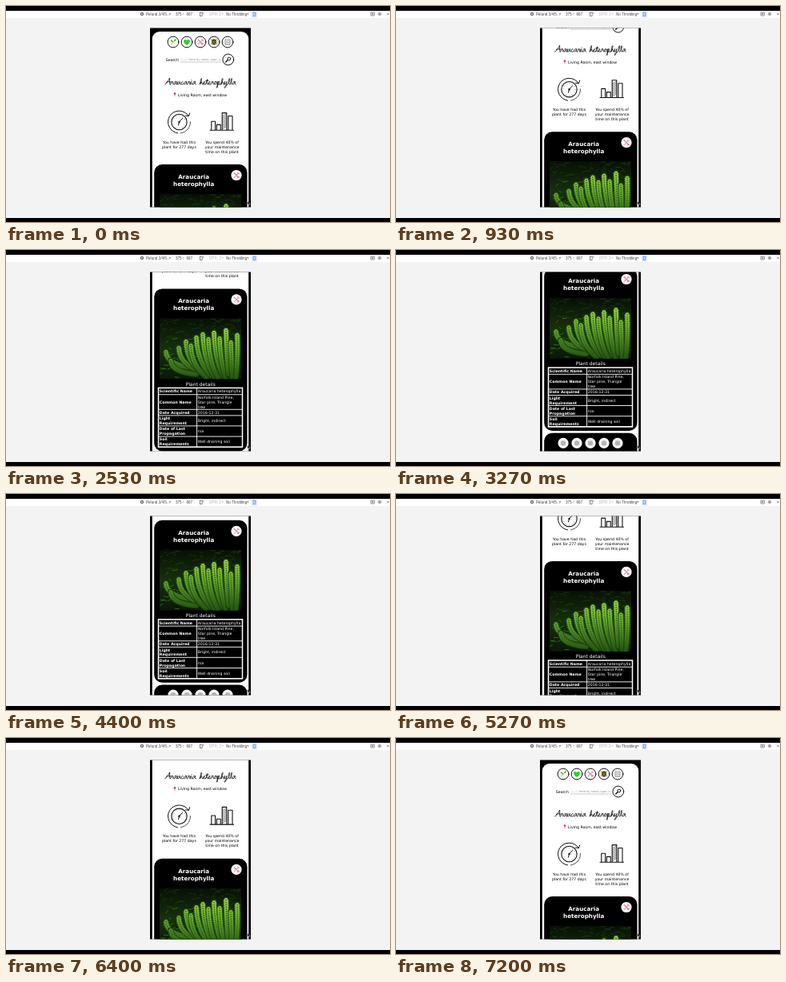
Recreate the animation shown at these times as an HTML page. Size 480x270 px, loop 7590 ms.

```html
<!DOCTYPE html>
<html lang="en">
<head>
<meta charset="utf-8">
<title>Plant page</title>
<style>
  html, body { margin: 0; width: 100%; height: 100%; overflow: hidden; background: #f3f3f3; }
  svg { display: block; width: 480px; height: 270px; }
  text { font: 4.7px "DejaVu Sans", Verdana, sans-serif; }
  .bar text { font: 4.6px "Liberation Sans", Arial, sans-serif; fill: #444; }
  .mid { text-anchor: middle; }
  .bold { font-weight: bold; }
  .line { fill: none; stroke: #111; stroke-linecap: round; stroke-linejoin: round; }
</style>
</head>
<body>
<svg viewBox="0 0 480 270">
  <defs>
    <clipPath id="screen"><rect x="180" y="27.5" width="126" height="224"/></clipPath>
    <clipPath id="photoBox"><rect width="102" height="76"/></clipPath>
    <linearGradient id="frond" gradientUnits="userSpaceOnUse" x1="0" y1="10" x2="0" y2="76">
      <stop offset="0" stop-color="#a5dc45"/>
      <stop offset=".45" stop-color="#62a62c"/>
      <stop offset="1" stop-color="#234f12"/>
    </linearGradient>
    <linearGradient id="shade" x1="0" y1="0" x2="0" y2="1">
      <stop offset="0" stop-color="#071005"/>
      <stop offset=".5" stop-color="#16300c"/>
      <stop offset="1" stop-color="#0a1806"/>
    </linearGradient>
    <g id="tools" class="line" stroke-width="1.1">
      <path stroke="#d9728c" style="stroke:#d9728c" d="M-3-3L3 3M1.6 3.2L3.2 1.6"/>
      <path style="stroke:#e59aac" d="M3-3L-3 3M1.6-3.4L2-2L3.4-1.6"/>
    </g>
  </defs>

  <rect width="480" height="270" fill="#f3f3f3"/>
  <g class="bar">
    <rect y="5" width="480" height="10" fill="#fff"/>
    <circle cx="170" cy="10" r="1.8" fill="#bbb" stroke="#555" stroke-width=".9"/>
    <text x="175" y="11.7">Pelund 3/4/5…</text>
    <text x="212" y="11.7">375</text>
    <text x="220.5" y="11.7" style="fill:#999">×</text>
    <text x="225.5" y="11.7">667</text>
    <g fill="none" stroke="#555" stroke-width=".7">
      <rect x="242.5" y="8" width="2.6" height="4.6"/>
      <path d="M246 8.2q1 .3 1 1.6"/>
      <rect x="456" y="8" width="4.4" height="4" rx=".7"/>
      <circle cx="458.2" cy="10" r=".7"/>
      <circle cx="467" cy="10" r="1.8" stroke-dasharray="1 .4"/>
      <circle cx="467" cy="10" r="1"/>
      <path d="M476.3 8.8l2.4 2.4m0-2.4l-2.4 2.4"/>
    </g>
    <text x="254" y="11.7" style="fill:#b5b5b5">DPR: 2</text>
    <text x="275" y="11.7">No Throttling</text>
    <path d="M203.8 9.2h2.4l-1.2 1.9zM301.2 9.2h2.2l-1.1 1.9z" fill="#555"/>
    <path d="M269.5 9.2h2.2l-1.1 1.9z" fill="#bbb"/>
    <rect x="307" y="6.5" width="7" height="8" fill="#dfeafb"/>
    <rect x="309.2" y="8" width="2.6" height="4.6" rx=".5" fill="none" stroke="#3f7fe0" stroke-width=".8"/>
  </g>
  <path d="M0 0H480V6H0zM0 265H480V270H0z"/>

  <g clip-path="url(#screen)">
    <rect x="180" y="27" width="126" height="226"/>
    <g id="page">
      <rect x="182.8" y="32" width="120.4" height="420" rx="9" fill="#fff"/>

      <g class="line" stroke-width="1" id="nav"></g>
      <g transform="translate(209 45)">
        <path class="line" stroke-width=".8" style="stroke:#63a52f" d="M-2.5 3L1-1"/>
        <path fill="#5fb52c" d="M1-1q0-3 3-2.6q0 2.6-3 2.6M0 0q-3.6 0-3.4-2.8q3 0 3.4 2.8"/>
      </g>
      <path transform="translate(226 45)" fill="#24d526" d="M0 4C-5 1-4.6-3-2.2-3Q-.8-3 0-1.8Q.8-3 2.2-3C4.6-3 5 1 0 4"/>
      <use href="#tools" x="243" y="45"/>
      <g transform="translate(260 45)">
        <ellipse rx="3" ry="3.4" fill="#302a10"/>
        <path class="line" stroke-width="1" style="stroke:#d5a51d" d="M-2-1H2M-2 1.2H2"/>
        <path class="line" stroke-width=".9" style="stroke:#55801f" d="M-2-2L-4-3M2-2L3.6-3.4M-2.6 2L-4 2.6M2.6 2L4 2.8"/>
      </g>
      <path transform="translate(277 45)" fill="none" stroke="#888" stroke-width=".7" d="M-3-3.5H3V3.5H-3zM-3-1.6H3M-3 .2H3M-3 2H3"/>

      <text x="199.8" y="68.8">Search</text>
      <text x="218.5" y="68.4" style="font-size:3.5px;fill:#888">♧♤♧ here by name, type, a</text>
      <path d="M218 70H268.5" stroke="#aaa" stroke-width=".6"/>
      <g class="line">
        <circle cx="278.8" cy="66" r="1.9" stroke-width="1"/>
        <path d="M277.2 67.6L274.7 70" stroke-width="1.4"/>
      </g>

      <g id="script" class="line" stroke-width=".85" role="img" aria-label="Araucaria heterophylla"></g>
      <circle cx="211" cy="109.5" r="1.3" fill="#d8344d"/>
      <path d="M211 110v2.9" stroke="#a33" stroke-width=".6"/>
      <text x="215" y="112.6">Living Room, east window</text>

      <g class="line" transform="translate(216.5 145)">
        <circle r="9.7" stroke-width="1.1"/>
        <circle r="7.7" stroke-width="1.3" stroke-dasharray=".3 3.73" stroke-linecap="butt"/>
        <path stroke-width="1" d="M0 0L4.2-4.6M0 0L-1 4M11.6-7.8A14 14 0 1 0-2 13.9"/>
        <path stroke-width="1" d="M13.2-11.2L12-7.4L8-8"/>
        <path stroke-width=".8" stroke-dasharray="2 1" d="M2 13.8A14 14 0 0 0 13.9-1"/>
        <circle r="1.2" fill="#111" stroke="none"/>
      </g>
      <g class="line" stroke-width="1.1">
        <path d="M255 155.3H284.5M256.8 155V144.2H261.6V155M263.4 155V148.4H268.2V155M270.2 155V133.6H275.8V155M277.8 155V137.5H283V155"/>
        <path id="hatch" stroke-width=".6"/>
      </g>
      <g id="facts" class="mid"></g>

      <rect x="185.2" y="198" width="116.3" height="203" rx="10"/>
      <g class="mid" fill="#fff">
        <text class="bold" x="234.7" y="216" style="font-size:7.15px">Araucaria</text>
        <text class="bold" x="234.7" y="225" style="font-size:7.15px">heterophylla</text>
        <text x="243.3" y="319.2" style="font-size:6px">Plant details</text>
      </g>
      <circle cx="288" cy="211.5" r="6.6" fill="#fff"/>
      <use href="#tools" x="288" y="211.5"/>
      <g transform="translate(192 234.8)" clip-path="url(#photoBox)">
        <rect width="102" height="76" fill="url(#shade)"/>
        <g id="photo" fill="none" stroke-linecap="round"></g>
      </g>
      <g id="table" fill="#fff"></g>

      <rect x="185.2" y="403.7" width="116.3" height="50" rx="10"/>
      <g id="links"></g>
    </g>
  </g>
  <path d="M301.8 244v4.6l1.1-1l.8 1.7l.8-.4l-.8-1.6h1.5z" stroke="#fff" stroke-width=".4"/>
</svg>

<script type="module">
const $ = id => document.getElementById(id);
const text = (x, y, str, cls = "") => `<text x="${x}" y="${y}" class="${cls}">${str}</text>`;
const ring = (x, y, r) => `<circle cx="${x}" cy="${y}" r="${r}"/>`;

const iconXs = [209, 226, 243, 260, 277];
$("nav").innerHTML = iconXs.map(x => ring(x, 45, 6.9)).join("") + ring(277.8, 67, 6.9);

// Handwritten letters: [advance, stroke]
const glyphs = {
  A: [7, "M0 0C2-.5 4.5-5 6-8C6.2-5 5.6-2 6.4 0M1.6-2.6C3-3.6 5-3.4 7-3"],
  r: [3.6, "M0 0C.8-1 1.2-2.6 1.6-4C1.8-3.2 2.4-3.2 3-3.4C2.4-2 2.6-.2 3.6 0"],
  a: [4.6, "M3.6-3.4C1.6-4.6 0-1.4 .8-.2C1.8 .6 3.2-1.6 3.7-3.4C3.2-1.6 3.2-.2 4.6 0"],
  u: [4.6, "M0 0C.6-1 .8-2.4 1.2-3.6C.6-1.6 .6 0 1.6-.1C2.6-.4 3.2-2.2 3.6-3.6C3.2-1.6 3.2-.2 4.6 0"],
  c: [3.6, "M3-3.2C1.8-4.4 .2-1.8 .8-.4C1.4 .4 2.8-.2 3.6-.6"],
  i: [2.6, "M0 0C.6-1 .9-2.4 1.2-3.6C.8-1.8 .8-.2 2.6 0M1.8-5.4l.1 .2"],
  h: [4.3, "M0 0C2-2 3.4-7 2.6-7.6C1.6-7.6 1-2 .8 0C1.4-2 2.4-3.8 3-3C3.2-2 2.4-.2 4.3 0"],
  e: [3.5, "M0-.6C1.4-1 2.8-2.6 2.2-3.5C1.2-4 .2-1.4 .8-.3C1.4 .4 2.8-.3 3.5-.8"],
  t: [3, "M0 0C.8-1.4 1.6-4 2-6.4C1.4-3.4 .8-.2 3 0M.2-4.4L3.6-4.9"],
  o: [4, "M2-3.6C.6-3.6 0-.2 1.4 0C3 0 3.6-3 2.2-3.6C2.4-2.6 3.2-2.6 4-3"],
  p: [4.5, "M0 0C.6-1 1-2.4 1.4-3.8C1-1 .4 2 0 4.4C.6 1 1.2-3.4 2.6-3.6C4-3.2 2.8 0 1.2-.2C2 .2 3.4 .2 4.5 0"],
  y: [4.5, "M0 0C.6-1 .8-2.4 1.2-3.6C.6-1.6 .6 0 1.6-.1C2.6-.4 3.2-2.2 3.6-3.6C3 0 2.4 4 1 4.4C-.4 4.2 2 .8 4.5 0"],
  l: [2.8, "M0 0C2-2 3.2-7 2.4-7.6C1.4-7.6 .4-.4 2.8 0"],
  " ": [4.4, ""]
};
let pen = 198.6;
$("script").innerHTML = [..."Araucaria heterophylla"].map(ch => {
  const [advance, d] = glyphs[ch];
  const path = `<path transform="translate(${pen} 98)" d="${d}"/>`;
  pen += advance;
  return path;
}).join("");

$("hatch").setAttribute("d", Array.from({ length: 8 }, (_, i) => `M270.6 ${138 + i * 2.2}l4.8-3`).join(""));

$("facts").innerHTML = [
  [216.4, "You have had this", "plant for 277 days"],
  [270, "You spend 40% of", "your maintenance", "time on this plant"]
].map(([x, ...lines]) => lines.map((s, i) => text(x, 171.7 + i * 6, s)).join("")).join("");

// Conifer branches
let seed = 7;
const rand = () => (seed = seed * 16807 % 2147483647) / 2147483647;
let art = "";
for (let i = 0; i < 170; i++) {
  const x = rand() * 102, y = rand() * 76;
  const color = x < 45 && y > 25 ? "#3c7a1d" : "#1c3b11";
  art += `<path d="M${x} ${y}l${2 + rand() * 5} ${rand() * 5 - 3}" stroke="${color}" stroke-width=".8"/>`;
}
const fronds = [
  [8, 42, 40, 62], [14, 53, 46, 70], [24, 37, 50, 66], [33, 29, 55, 70], [39, 34, 59, 74],
  [46, 24, 64, 72], [54, 20, 69, 74], [61, 26, 74, 76], [68, 18, 79, 72], [75, 25, 83, 76],
  [83, 15, 86, 70], [89, 30, 91, 78], [97, 21, 95, 76]
];
for (const [x, y, bx, by] of fronds) {
  const d = `M${x} ${y}Q${x + 1} ${(y + by) / 2 + 6} ${bx} ${by}`;
  art += `<path d="${d}" stroke="#193c0d" stroke-width="7.5"/>
    <path d="${d}" stroke="url(#frond)" stroke-width="5"/>
    <path d="${d}" stroke="url(#frond)" stroke-width="6.8" stroke-linecap="butt" stroke-dasharray=".7 1.1"/>
    <path d="${d}" stroke="#2c6415" stroke-width="1.6" stroke-dasharray=".2 2.6"/>`;
}
$("photo").innerHTML = art;

// Rows: [height, label lines, value lines]
const rows = [
  [8.3, ["Scientific Name"], ["Araucaria heterophylla"]],
  [18.6, ["Common Name"], ["Norfolk Island Pine,", "Star pine, Triangle", "tree"]],
  [7.6, ["Date Acquired"], ["2016-12-31"]],
  [13, ["Light", "Requirement"], ["Bright, indirect"]],
  [13.2, ["Date of Last", "Propagation"], ["n/a"]],
  [13.2, ["Soil", "Requirements"], ["Well draining soil"]]
];
const cell = (x, mid, lines, cls) =>
  lines.map((s, i) => text(x, mid + 1.7 + (i - (lines.length - 1) / 2) * 5.9, s, cls)).join("");
let rowY = 322, cells = "", rules = "";
for (const [h, label, value] of rows) {
  cells += cell(191.8, rowY + h / 2, label, "bold") + cell(239.8, rowY + h / 2, value);
  rowY += h;
  rules += `M190.5 ${rowY}H295.5`;
}
$("table").innerHTML = cells + `<path d="${rules}M238.6 322V${rowY}" stroke="#fff" stroke-width=".9"/>
  <rect x="190.5" y="322" width="105" height="${rowY - 322}" fill="none" stroke="#fff" stroke-width="1.5"/>`;

$("links").innerHTML = iconXs.map(x =>
  `<g fill="#f4f4f4">${ring(x, 416.4, 6.6)}</g><g fill="#b4b4b4">${ring(x, 416.4, 3.2)}</g>`).join("");

// Scroll down, rest at the end, scroll back; stepped at 15 per second
const LOOP = 7590, STEP = 1000 / 15, END = 175;
function scrollAt(ms) {
  const t = Math.floor((ms + 4) / STEP) * STEP;
  return Math.max(0, Math.min((t - 333.4) * 0.068, END, (7200 - t) * 0.059));
}
const start = performance.now();
function draw() {
  const ms = (performance.now() - start) % LOOP;
  $("page").setAttribute("transform", `translate(0 ${-scrollAt(ms)})`);
  requestAnimationFrame(draw);
}
draw();
</script>
</body>
</html>
```
